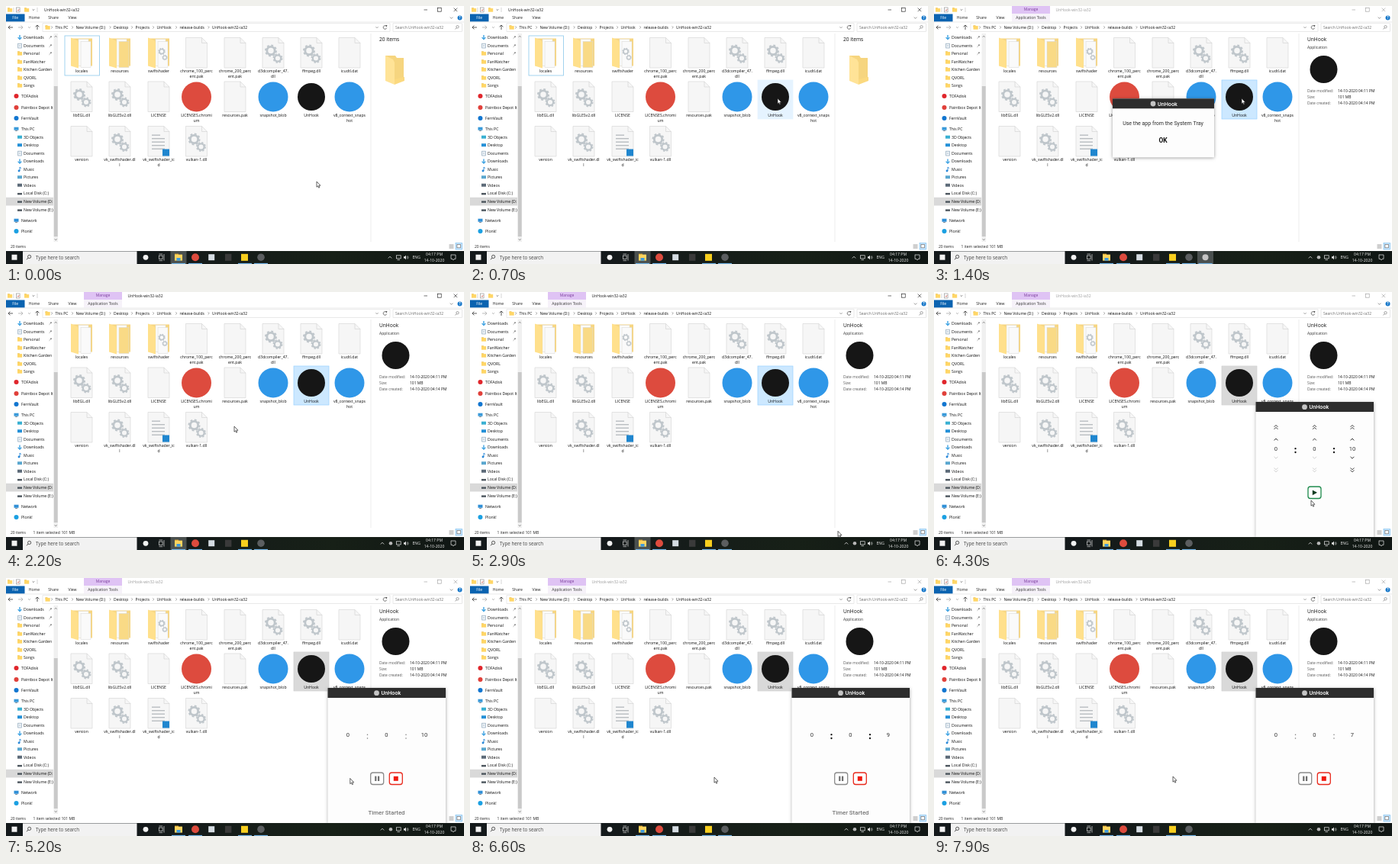
An HTML page with a canvas for the animation above (8 s loop, 600 by 338 pixels).

```html
<!DOCTYPE html>
<html lang="en">
<head>
<meta charset="utf-8">
<title>Timer demo</title>
<style>
html, body { margin: 0; width: 100%; height: 100%; overflow: hidden; background: #fff; }
canvas { display: block; width: 600px; height: 338px; }
</style>
</head>
<body>
<canvas id="stage"></canvas>
<script>
const LOOP = 8000, W = 600, H = 338;
const UI = '"Open Sans", "Noto Sans", sans-serif';
const APP = 'Roboto, Arial, sans-serif';
const cv = document.getElementById('stage');
const c = cv.getContext('2d');
const dpr = window.devicePixelRatio || 1;
cv.width = W * dpr;
cv.height = H * dpr;

// moments of the story, in ms
const SELECT = 850, DIALOG = 1250, CLOSE = 2150;
const PANEL = 3250, TEN = 3700, START = 4870;
const focused = t => t < DIALOG || t >= CLOSE && t < PANEL;

function text(s, x, y, size = 5.1, color = '#111', align = 'left', font = UI, weight = 400) {
  c.font = `${weight} ${size}px ${font}`;
  c.textAlign = align;
  c.fillStyle = color;
  c.fillText(s, x, y + size * 0.35);
}
function box(x, y, w, h, fill, stroke, lw = 0.7) {
  if (fill) { c.fillStyle = fill; c.fillRect(x, y, w, h); }
  if (stroke) { c.strokeStyle = stroke; c.lineWidth = lw; c.strokeRect(x, y, w, h); }
}
function dot(x, y, r, fill) {
  c.beginPath();
  c.arc(x, y, r, 0, 7);
  c.fillStyle = fill;
  c.fill();
}
function ring(x, y, r, color, lw = 0.8, from = 0, to = 7) {
  c.beginPath();
  c.arc(x, y, r, from, to);
  c.strokeStyle = color;
  c.lineWidth = lw;
  c.stroke();
}
function trace(pts) {
  c.beginPath();
  pts.forEach(([x, y], i) => i ? c.lineTo(x, y) : c.moveTo(x, y));
}
function poly(pts, fill) {
  trace(pts);
  c.closePath();
  c.fillStyle = fill;
  c.fill();
}
function line(pts, color, lw = 0.7) {
  trace(pts);
  c.strokeStyle = color;
  c.lineWidth = lw;
  c.stroke();
}
// dir: 1 points down, -1 points up
function chev(x, y, dir, color = '#555', r = 2, lw = 0.8) {
  line([[x - r, y - dir * r / 2], [x, y + dir * r / 2], [x + r, y - dir * r / 2]], color, lw);
}
function side(x, y) {
  line([[x - 0.8, y - 1.6], [x + 0.8, y], [x - 0.8, y + 1.6]], '#666', 0.6);
}

function gear(x, y, r) {
  ring(x, y, r * 0.66, '#bfc6cb', r * 0.36);
  c.setLineDash([r * 0.36, r * 0.349]);
  ring(x, y, r * 0.9, '#bfc6cb', r * 0.26);
  c.setLineDash([]);
}
function gears(x, y) {
  gear(x - 3, y - 3, 7.8);
  gear(x + 6, y + 7, 6.3);
}
function page(x, y) {
  const l = x - 14, r = x + 14, t = y - 20, b = y + 19.5;
  const edge = [[l, t], [r - 7, t], [r, t + 7], [r, b], [l, b]];
  poly(edge, '#f6f6f6');
  line([...edge, edge[0]], '#d9d9d9', 0.7);
  line([[r - 7, t], [r - 7, t + 7], [r, t + 7]], '#d0d0d0', 0.6);
}
function folder(x, y, kind) {
  box(x - 13, y - 19, 27, 36, '#f7d681');
  box(x - 4, y - 18, 13, 35, '#fbfbfb', '#dddddd', 0.5);
  box(x - 1, y - 15, 13, 34, kind === 'yellow' ? '#f9da86' : '#fafafa', '#d8d8d8', 0.5);
  if (kind === 'gears') { gear(x + 4, y - 2, 4.6); gear(x + 8, y + 6, 3.6); }
  poly([[x - 14, y - 20], [x - 5, y - 16], [x - 4, y - 13], [x - 4, y + 20], [x - 14, y + 17]], '#ffe08c');
}
function smallFolder(x, y) {
  box(x - 3, y - 2.6, 3, 2, '#e8b93e');
  box(x - 3, y - 1.9, 6.2, 4.6, '#ffd667');
}
const blueDisc = (x, y) => dot(x, y, 19.5, '#2f97e8');
const appMark = (x, y) => dot(x, y, 18, '#161616');
const dll = (x, y) => { page(x, y); gears(x, y); };
function noted(x, y) {
  page(x, y);
  for (let i = 0; i < 5; i++) box(x - 9, y - 9 + i * 4.5, i === 0 ? 11 : 17, 1.4, '#b9bdc1');
  box(x + 5, y + 10, 9, 9, '#1f86cf');
}

const cols = [99, 149, 200, 249.5, 300, 350, 400, 450];
const files = [
  [[(x, y) => folder(x, y, 'white'), 'locales'], [(x, y) => folder(x, y, 'yellow'), 'resources'],
   [(x, y) => folder(x, y, 'gears'), 'swiftshader'], [page, 'chrome_100_perc', 'ent.pak'],
   [page, 'chrome_200_perc', 'ent.pak'], [dll, 'd3dcompiler_47.', 'dll'], [dll, 'ffmpeg.dll'], [page, 'icudtl.dat']],
  [[dll, 'libEGL.dll'], [dll, 'libGLESv2.dll'], [page, 'LICENSE'],
   [(x, y) => dot(x, y, 19.5, '#dd4b3e'), 'LICENSES.chromi', 'um'], [page, 'resources.pak'],
   [blueDisc, 'snapshot_blob'], [appMark, 'UnHook'], [blueDisc, 'v8_context_snaps', 'hot']],
  [[page, 'version'], [dll, 'vk_swiftshader.dl', 'l'], [noted, 'vk_swiftshader_ic', 'd'], [dll, 'vulkan-1.dll']]
];
const rows = [61.5, 119, 177.5];

function tileColors(t) {
  const [px, py] = pointer(t);
  if (t >= PANEL) return ['#d9d9d9', '#d0d0d0'];
  if (t >= SELECT) return ['#cce8ff', '#99d1ff'];
  return px > 377 && px < 423 && py > 97 && py < 148 ? ['#e5f3ff', '#e5f3ff'] : null;
}
function drawFiles(t) {
  if (t < SELECT) box(77, 39, 45.5, 52, null, '#8cc8ea', 0.8);
  const tile = tileColors(t);
  if (tile) box(377, 97, 46, 51, ...tile);
  files.forEach((row, r) => row.forEach(([icon, ...names], i) => {
    icon(cols[i], rows[r]);
    names.forEach((s, k) => text(s, cols[i], rows[r] + 24 + k * 7, 5.15, '#111', 'center'));
  }));
}

const FOLDER = '#ffd667', BLUE = '#2f9be0';
// label, y, icon colour, level (1 = indented)
const nav = [
  ['Downloads', 41, BLUE, 1], ['Documents', 52, '#8aa4b8', 1], ['Personal', 62, FOLDER, 1],
  ['FanWatcher', 73, FOLDER, 1], ['Kitchen Garden', 83, FOLDER, 1], ['QVORL', 94, FOLDER, 1], ['Songs', 104, FOLDER, 1],
  ['TOFAdisk', 118, '#e0262c', 0], ['Paintbox Depot Item', 133, '#e0403a', 0], ['FernVault', 147, '#1276d0', 0],
  ['This PC', 161, '#3a9ad9', 0], ['3D Objects', 172, '#39b0d2', 1], ['Desktop', 182.5, '#2591d8', 1],
  ['Documents', 193, '#8aa4b8', 1], ['Downloads', 203.5, BLUE, 1], ['Music', 214, '#2787d8', 1],
  ['Pictures', 224.5, '#5aa7cf', 1], ['Videos', 235, '#5c6a78', 1], ['Local Disk (C:)', 245.5, '#4d565e', 1],
  ['New Volume (D:', 256, '#4d565e', 1], ['New Volume (E:)', 267, '#4d565e', 1],
  ['Network', 281, '#2f8fd6', 0], ['Plonk!', 295, '#1ba0e2', 0]
];
function drawNav() {
  box(0, 250.7, 62, 10.8, '#d9d9d9');
  nav.forEach(([s, y, color, deep]) => {
    const x = deep ? 18 : 13.5;
    if (color === FOLDER) smallFolder(x, y);
    else if (s.includes('(')) box(x - 3, y - 0.6, 6, 2.4, color);
    else if (s === 'Downloads') {
      line([[x, y - 3], [x, y + 2]], color, 1.3);
      chev(x, y + 1.4, 1, color, 2.4, 1.2);
    } else if (s === 'Documents') {
      box(x - 2.3, y - 2.8, 4.6, 5.8, '#f3f7fa', color);
      line([[x - 1.2, y], [x + 1.2, y]], color);
    } else if (s === 'Music') {
      line([[x, y + 2], [x, y - 3], [x + 2, y - 1.4]], color, 0.9);
      dot(x - 1, y + 2, 1.4, color);
    } else if (deep || s === 'This PC' || s === 'Network') {
      box(x - 3, y - 2.3, 6, 4, color);
      if (!deep) box(x - 1.5, y + 2.2, 3, 0.8, '#6b7782');
    } else dot(x, y, 3, color);
  });
  c.save();
  c.beginPath();
  c.rect(0, 34, 62, 275);
  c.clip();
  nav.forEach(([s, y, , deep]) => text(s, deep ? 23 : 20, y, 5.15));
  c.restore();
  for (const y of [41, 52, 62]) {
    line([[56.5, y + 1.8], [59, y - 0.6]], '#777', 0.6);
    dot(59, y - 0.8, 0.9, '#777');
  }
  box(62.5, 36, 5.5, 273, '#f0f0f0');
  box(62.8, 105, 4.9, 197, '#c9c9c9');
  chev(65.2, 40, -1, '#606060', 1.4);
  chev(65.2, 306, 1, '#606060', 1.4);
}

function drawTop(t) {
  const sel = t >= SELECT, ink = focused(t) ? '#111' : '#999';
  smallFolder(5, 5);
  box(13.5, 2, 4.6, 6, '#fafafa', '#8b8b8b', 0.6);
  line([[14.8, 5], [16, 6.4], [17.4, 4]], '#d04a3a', 0.6);
  line([[10, 2], [10, 8]], '#aaa', 0.5);
  smallFolder(27, 5);
  chev(36, 5, 1, '#444', 1.3, 0.7);
  line([[41, 2], [41, 8]], '#aaa', 0.5);
  if (sel) {
    box(102, 0, 50, 10, '#dfc3f4');
    box(102, 10, 50, 10.5, '#f6f2f9');
    text('Manage', 127, 4.5, 5, '#7b3f9c', 'center');
    text('Application Tools', 127, 15.5, 5, '#333', 'center');
  }
  text('UnHook-win32-ia32', sel ? 159.5 : 50, 5, 5, ink);
  line([[547.5, 5], [552, 5]], ink, 0.6);
  box(565.6, 2.6, 4.6, 4.6, null, ink, 0.6);
  line([[586.6, 2.6], [591.2, 7.2]], ink, 0.6);
  line([[591.2, 2.6], [586.6, 7.2]], ink, 0.6);

  box(0, 10.5, 24.5, 10, '#0b63b0');
  text('File', 12.2, 15.5, 5.1, '#fff', 'center');
  [['Home', 37], ['Share', 62], ['View', 87]].forEach(([s, x]) => text(s, x, 15.5, 5.1, '#222', 'center'));
  chev(583.5, 15.5, 1, '#555', 1.8, 0.6);
  dot(594.5, 15.5, 3, '#1979ca');
  text('?', 594.5, 15.5, 4.4, '#fff', 'center', UI, 700);
  line([[0, 21], [600, 21]], '#dcdcdc', 0.6);

  line([[3, 28], [9, 28]], '#333', 0.8);
  line([[5.4, 25.6], [3, 28], [5.4, 30.4]], '#333', 0.8);
  line([[16, 28], [22, 28]], '#aaa', 0.8);
  line([[19.6, 25.6], [22, 28], [19.6, 30.4]], '#aaa', 0.8);
  chev(30.5, 28, 1, '#777', 1.4, 0.6);
  line([[41, 25], [41, 31]], '#333', 0.8);
  line([[38.6, 27.4], [41, 25], [43.4, 27.4]], '#333', 0.8);
  box(48, 22.8, 455, 10.6, '#fff', '#d9d9d9', 0.6);
  smallFolder(54.5, 28);
  const crumbs = [['This PC', 64.5], ['New Volume (D:)', 91.5], ['Desktop', 141], ['Projects', 169.5],
    ['UnHook', 197.5], ['release-builds', 227.5], ['UnHook-win32-ia32', 270]];
  crumbs.forEach(([s, x]) => { side(x - 4.5, 28); text(s, x, 28, 5); });
  chev(486, 28, 1, '#555', 1.5, 0.6);
  ring(496.5, 28, 2.3, '#444', 0.7, 0.3, 5.4);
  poly([[497, 25], [499.4, 25.2], [498.8, 27.6]], '#444');
  box(507, 22.8, 90.5, 10.6, '#fff', '#d9d9d9', 0.6);
  text('Search UnHook-win32-ia32', 510, 28, 5, '#6d6d6d');
  ring(591.5, 27.3, 1.7, '#666', 0.6);
  line([[590.3, 28.6], [588.5, 30.4]], '#666', 0.7);
}

function drawDetails(t) {
  line([[478, 36], [478, 309]], '#e6e6e6', 0.7);
  if (t < SELECT) {
    text('20 items', 489, 44, 6.6);
    poly([[497, 65], [510, 65], [512, 68], [521, 68], [521, 98], [497, 98]], '#f6d57f');
    poly([[497, 65], [507, 70], [509, 74], [509, 103], [497, 98]], '#ffe397');
    poly([[509, 103], [509, 96], [522, 93], [522, 98]], '#fbd97f');
  } else {
    text('UnHook', 489, 44, 6.6);
    text('Application', 489, 54, 5, '#333');
    appMark(510.5, 83);
    [['Date modified:', '14-10-2020 04:11 PM'], ['Size:', '101 MB'], ['Date created:', '14-10-2020 04:14 PM']]
      .forEach(([k, v], i) => {
        text(k, 489, 111 + i * 8, 4.95, '#555');
        text(v, 529, 111 + i * 8, 4.95, '#111');
      });
  }
  text('20 items', 6, 315, 5, '#222');
  if (t >= SELECT) {
    text('1 item selected', 35.5, 315, 5, '#222');
    text('101 MB', 72.5, 315, 5, '#222');
  }
  for (let i = 0; i < 3; i++) line([[580.5, 313 + i * 2], [586.5, 313 + i * 2]], '#777', 0.7);
  box(589, 310.5, 8.5, 8.5, '#cce8ff', '#6ab6ea', 0.6);
  box(590.9, 312.6, 4.6, 4.2, '#fff', '#555', 0.6);
}

function drawTaskbar(t) {
  const dialog = t >= DIALOG && t < CLOSE;
  const shade = c.createLinearGradient(172, 0, W, 0);
  shade.addColorStop(0, '#14191b');
  shade.addColorStop(0.6, '#172017');
  shade.addColorStop(1, '#101614');
  box(0, 321, W, 17, shade);
  box(7.5, 325.7, 7, 7, '#f2f2f2');
  box(22, 321.4, 149.5, 16.6, '#f2f2f2');
  ring(30.6, 328.4, 2.1, '#333', 0.8);
  line([[29, 330.1], [27, 332.2]], '#333', 0.9);
  text('Type here to search', 39, 329.5, 6.25, '#444');
  dot(183, 329.3, 3.4, '#f2f2f2');
  box(200.5, 327, 4.6, 4.6, null, '#ddd', 0.7);
  line([[200.5, 325], [205.1, 325]], '#ddd', 0.7);
  line([[200.5, 333.6], [205.1, 333.6]], '#ddd', 0.7);
  line([[207, 325], [207, 333.6]], '#ddd', 0.7);

  if (focused(t)) box(215.5, 321, 21, 17, '#4a504f');
  box(221, 324.6, 5, 3, '#dca52f');
  box(221, 325.6, 10, 8, '#ffd45e');
  box(223.5, 330, 5, 3.6, '#3d9ade');
  dot(248, 329.2, 5, '#dd4b3e');
  box(265.2, 325.2, 8, 8, '#d5dce2');
  box(287, 324.8, 8.4, 9, '#3a3a3a');
  box(308, 324.8, 9, 9, '#f8cf1e');
  dot(334, 329.2, 4.8, '#5b5e60');
  const open = [226, 248, 313, 334];
  if (dialog) {
    box(345, 321, 21, 17, '#4a504f');
    dot(355.5, 329.3, 4, '#c4c4c4');
    open.push(355.5);
  }
  open.forEach(x => box(x - 9, 336.9, 18, 1.1, '#76b9ed'));

  const tray = t >= DIALOG;
  chev(tray ? 493 : 503, 329.3, -1, '#e8e8e8', 2.2, 0.8);
  if (tray) dot(504, 329.3, 2.3, '#b8b8b8');
  box(511.4, 326.8, 5.8, 4, null, '#e8e8e8', 0.7);
  line([[512.5, 332.6], [516, 332.6]], '#e8e8e8', 0.7);
  poly([[521, 328.2], [522.4, 328.2], [524, 326.6], [524, 332.2], [522.4, 330.6], [521, 330.6]], '#e8e8e8');
  for (const r of [1.6, 3]) ring(524, 329.4, r, '#e8e8e8', 0.6, -0.8, 0.8);
  text('ENG', 532.5, 329.5, 5.1, '#f0f0f0');
  text('04:17 PM', 561, 325, 5.1, '#f0f0f0', 'center');
  text('14-10-2020', 561, 333.3, 5.1, '#f0f0f0', 'center');
  line([[583, 326], [589, 326], [589, 331.4], [587, 331.4], [586, 333], [585, 331.4], [583, 331.4], [583, 325.7]], '#e8e8e8', 0.7);
}

function appWindow(x, y, w, h, mid) {
  c.save();
  c.shadowColor = 'rgba(0,0,0,0.4)';
  c.shadowBlur = 4 * dpr;
  c.shadowOffsetY = dpr;
  box(x, y, w, h, '#fdfdfd');
  c.restore();
  box(x, y, w, 13, '#2d2d2d');
  dot(mid - 13, y + 6.7, 3.4, '#c4c4c4');
  text('UnHook', mid - 7, y + 6.7, 7.2, '#fff', 'left', APP, 500);
}
function drawDialog() {
  appWindow(234, 121.3, 133, 77, 300);
  text('Use the app from the System Tray', 300, 154, 7.05, '#2b2b2b', 'center', APP);
  text('OK', 300, 176.5, 8.4, '#111', 'center', APP, 700);
}
function button(x, color) {
  c.beginPath();
  c.roundRect(x, 255, 17, 15.5, 3);
  c.fillStyle = '#fff';
  c.fill();
  c.strokeStyle = color;
  c.lineWidth = 1.3;
  c.stroke();
}
function drawPanel(t) {
  const run = t >= START, since = t - START;
  const secs = t < TEN ? 0 : run ? 10 - Math.floor(since / 1000) : 10;
  c.save();
  c.beginPath();
  c.rect(410, 130, 190, 191);
  c.clip();
  appWindow(421.5, 144, 154.5, 177, 498.5);
  c.restore();

  [448, 498.5, 548].forEach((x, i) => {
    const v = i === 2 ? secs : 0;
    text(String(v), x, 205, 7.6, '#333', 'center', APP);
    if (run) return;
    const low = v ? '#222' : '#c8c8c8';
    for (const y of [175.6, 178.6, 193.2]) chev(x, y, -1, '#222', 2.4, 0.9);
    for (const y of [217, 231.6, 234.6]) chev(x, y, 1, low, 2.4, 0.9);
  });
  const dim = run && since % 1000 < 520;
  for (const x of [473.5, 524]) for (const y of [205.2, 210]) dot(x, y, dim ? 0.75 : 1.15, dim ? '#777' : '#111');

  if (!run) {
    button(490, '#1e8a4c');
    poly([[495.8, 259.4], [495.8, 266.2], [502, 262.8]], '#123d22');
    return;
  }
  button(477.7, '#8a8a8a');
  box(483.2, 259.6, 2.2, 6.4, '#6e6e6e');
  box(487, 259.6, 2.2, 6.4, '#6e6e6e');
  button(502.3, '#e8291c');
  box(507.8, 259.8, 6, 6, '#f01a10');
  const alpha = Math.min(1, since / 200, (7350 - t) / 400);
  if (alpha > 0) {
    c.globalAlpha = alpha;
    text('Timer Started', 498.5, 307, 7.8, '#757575', 'center', APP, 500);
    c.globalAlpha = 1;
  }
}

// time, x, y of the pointer's stops
const path = [
  [0, 407, 230], [650, 403, 121], [1420, 403, 121], [1950, 299, 176], [2300, 299, 176],
  [3050, 503, 329], [3250, 503, 329], [3600, 549, 177], [3780, 549, 177],
  [4300, 494, 273], [4650, 497, 263], [4950, 497, 263], [5700, 320, 261], [6600, 320, 261], [7400, 313, 260]
];
function pointer(t) {
  const i = path.findIndex(p => p[0] > t);
  if (i < 0) return path[path.length - 1].slice(1);
  const [t0, x0, y0] = path[i - 1], [t1, x1, y1] = path[i];
  const u = (t - t0) / (t1 - t0), e = u * u * (3 - 2 * u);
  return [x0 + (x1 - x0) * e, y0 + (y1 - y0) * e];
}
function drawPointer(t) {
  const [x, y] = pointer(t);
  const shape = [[0, 0], [0, 7.2], [1.6, 5.8], [2.7, 8.2], [3.8, 7.7], [2.8, 5.3], [4.9, 5.2]].map(([a, b]) => [x + a, y + b]);
  poly(shape, '#fff');
  line([...shape, shape[0]], '#222', 0.7);
}

function draw(t) {
  c.setTransform(dpr, 0, 0, dpr, 0, 0);
  box(0, 0, W, H, '#fff');
  drawTop(t);
  drawNav();
  drawFiles(t);
  drawDetails(t);
  drawTaskbar(t);
  if (t >= DIALOG && t < CLOSE) drawDialog();
  if (t >= PANEL) drawPanel(t);
  drawPointer(t);
}
const begin = performance.now();
function tick() {
  draw((performance.now() - begin) % LOOP);
  requestAnimationFrame(tick);
}
tick();
</script>
</body>
</html>
```
